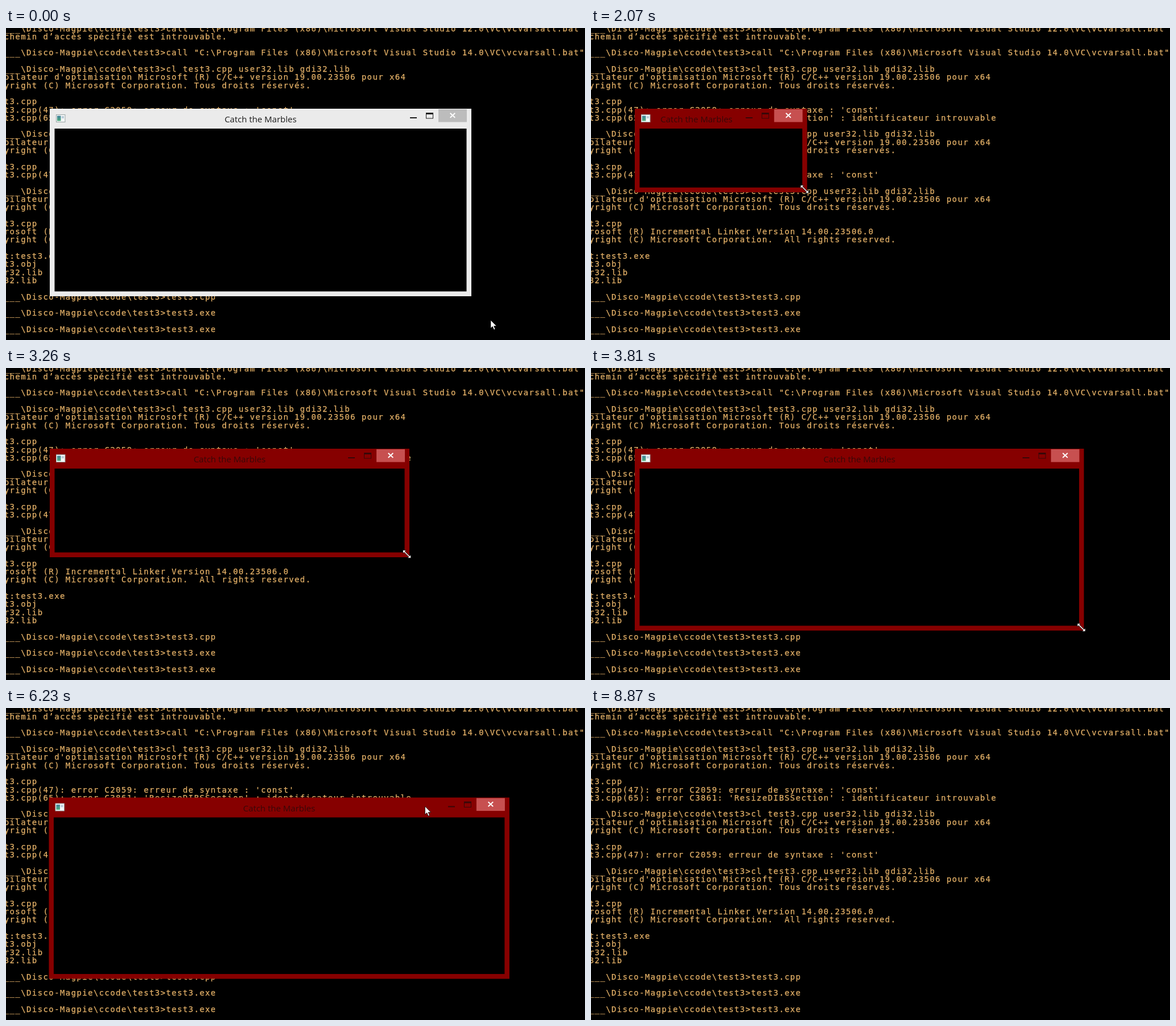
These frames come from a looping animation (1019x549 px, 9.32 s). An HTML page:

```html
<!DOCTYPE html>
<html lang="fr">
<head>
<meta charset="utf-8">
<title>Console</title>
<style>
  html, body { margin: 0; width: 100%; height: 100%; overflow: hidden; background: #000; }
  svg { position: absolute; left: 0; top: 0; width: 100%; height: 100%; }
  #log {
    font: 14px "DejaVu Sans Mono", monospace; letter-spacing: 1.4px;
    fill: #e3b067; stroke: #e3b067; stroke-width: .25;
  }
  #log text { white-space: pre; }
  #title { font: 15px "Open Sans", sans-serif; text-anchor: middle; }
</style>
</head>
<body>
<svg viewBox="0 0 1019 549"><g id="log"></g></svg>

<svg id="win" viewBox="0 0 1019 549">
  <defs>
    <linearGradient id="teal" x2="0" y2="1">
      <stop offset="0" stop-color="#3f7f9c"/><stop offset="1" stop-color="#4fae7c"/>
    </linearGradient>
  </defs>
  <g id="frame">
    <rect id="edge"/>
    <rect id="client" x="8.5" y="35"/>
    <rect x="11.5" y="10.5" width="15.5" height="13" fill="#f4f6f6" stroke="#9aa5a5"/>
    <rect x="13" y="12.5" width="6.5" height="9" fill="url(#teal)"/>
    <rect x="21" y="13" width="4" height="4" fill="#b9cbd8"/>
    <text id="title" y="24">Catch the Marbles</text>
    <g id="buttons">
      <g id="glyphs">
        <rect x="-108" y="15" width="12" height="2"/>
        <path d="M-80 7h13v10.5h-13zM-79 10v6.5h11v-6.5z" fill-rule="evenodd"/>
      </g>
      <rect id="close" x="-58" y="1" width="50" height="22.5"/>
      <path d="M-37.3 7.7l8.6 8M-28.7 7.7l-8.6 8" stroke="#fff" stroke-width="1.9"/>
    </g>
  </g>
</svg>

<svg viewBox="0 0 1019 549">
  <g id="cursor" fill="#fff" stroke="#000" stroke-width=".7">
    <path id="arrow" d="M0 0V14.3L3.3 11.3L5.7 17L8 16L5.7 10.5H10.3Z"/>
    <path id="sizer" d="M-7 -7H-1.5L-3.3 -4.7L4.7 3.3L7 1.5V7H1.5L3.3 4.7L-4.7 -3.3L-7 -1.5Z"/>
  </g>
</svg>

<script>
const LOOP = 9320;
const GRAB = 1400, RELEASE = 4050, DRAG = 5740, DROP = 6340;
const CLOSE = 7400, CLOSED = 7710, CURSOR_OFF = 8870;
const $ = id => document.getElementById(id);
const set = (id, attrs) => {
  for (const k in attrs) $(id).setAttribute(k, attrs[k]);
};
const show = on => on ? "inline" : "none";

// Console text; blank rows are kept
const prompt = "___\\Disco-Magpie\\ccode\\test3>";
const call = v => `${prompt}call "C:\\Program Files (x86)\\Microsoft Visual Studio ${v}\\VC\\vcvarsall.bat"`;
const rights = "yright (C) Microsoft Corporation. ";
const compile = `${prompt}cl test3.cpp user32.lib gdi32.lib
pilateur d'optimisation Microsoft (R) C/C++ version 19.00.23506 pour x64
${rights}Tous droits réservés.

t3.cpp`;
const syntax = "t3.cpp(47): error C2059: erreur de syntaxe : 'const'";
const log = `${call("12.0")}
chemin d’accès spécifié est introuvable.

${call("14.0")}

${compile}
${syntax}
t3.cpp(65): error C3861: 'ResizeDIBSSection' : identificateur introuvable

${compile}
${syntax}

${compile}
rosoft (R) Incremental Linker Version 14.00.23506.0
${rights} All rights reserved.

t:test3.exe
t3.obj
r32.lib
32.lib

${prompt}test3.cpp

${prompt}test3.exe

${prompt}test3.exe`;
log.split("\n").forEach((row, n) => {
  const line = document.createElementNS("http://www.w3.org/2000/svg", "text");
  line.setAttribute("x", -3.3);
  line.setAttribute("y", 5.5 + 14.306 * n);
  line.textContent = row;
  $("log").append(line);
});

const progress = (t, from, to) => Math.min(1, Math.max(0, (t - from) / (to - from)));
const smooth = u => u * u * (3 - 2 * u);
const mix = (a, b, u) => a + (b - a) * u;

// Eased travel through [time, x, y] stops
function travel(stops, t) {
  let [, x, y] = stops[0];
  for (let i = 1; i < stops.length; i++) {
    const [end, nx, ny] = stops[i];
    const u = smooth(progress(t, stops[i - 1][0], end));
    x = mix(x, nx, u);
    y = mix(y, ny, u);
  }
  return [x, y];
}
const approach = [[0, 853, 514], [550, 742, 441], [1150, 815, 467]];
const resize = [[GRAB, 819, 472], [2300, 296, 254], [2800, 804, 470], [3260, 710, 333],
  [3810, 867.5, 462], [3910, 887.5, 461]];
const toTitle = [[RELEASE, 882, 455], [4600, 827, 166], [DRAG, 739, 157.5]];
const toClose = [[6560, 737, 181], [7070, 852, 181], [7880, 852, 181], [8820, 1001, 545]];

function cursorAt(t, x, y, right, bottom) {
  if (t < GRAB) return travel(approach, t);
  if (t < RELEASE) return [right - 4.5, bottom - 5.5];
  if (t < DRAG) return travel(toTitle, t);
  if (t < 6560) return [x + 662, y + 15.5];
  return travel(toClose, t);
}

function drawWindow(t, x, y, w, h) {
  const active = t >= GRAB;
  const ink = active ? "#380808" : "#1c1c1c";
  set("frame", { transform: `translate(${x} ${y})` });
  set("edge", { width: w, height: h, fill: active ? "#860000" : "#ebebeb" });
  set("client", { width: w - 17, height: h - 43.5 });
  set("buttons", { transform: `translate(${w})` });
  set("glyphs", { fill: ink });
  set("close", { fill: active ? "#c75050" : "#bcbcbc" });
  // The title stays clear of the buttons on a narrow window
  const centred = w / 2 + 65 < w - 116;
  set("title", { x: centred ? w / 2 : (w - 86) / 2, fill: ink });
}

// The closing window tips back as it fades
function fadeWindow(p, cx, cy) {
  const style = $("win").style;
  style.opacity = 1 - p ** 4;
  style.transformOrigin = `${cx}px ${cy}px`;
  style.transform = p > 0
    ? `perspective(4000px) translateY(${p}px) rotateX(${9 * p}deg) scale(${1 - 0.0136 * p})`
    : "none";
}

function render(t) {
  const drag = progress(t, DRAG, DROP) ** 2;
  const x = mix(77, 74.7, drag), y = mix(142, 165.2, drag);
  const [right, bottom] = travel(resize, t);
  const w = right - 77, h = bottom - 142;
  drawWindow(t, x, y, w, h);
  fadeWindow(progress(t, CLOSE, CLOSED), x + w / 2, y + h / 2);

  const [px, py] = cursorAt(t, x, y, x + w, y + h);
  const sizing = t >= 1100 && t < RELEASE;
  set("cursor", { transform: `translate(${px} ${py})`, display: show(t < CURSOR_OFF) });
  set("arrow", { display: show(!sizing) });
  set("sizer", { display: show(sizing) });
}

const start = performance.now();
function tick() {
  render((performance.now() - start) % LOOP);
  requestAnimationFrame(tick);
}
tick();
</script>
</body>
</html>
```
